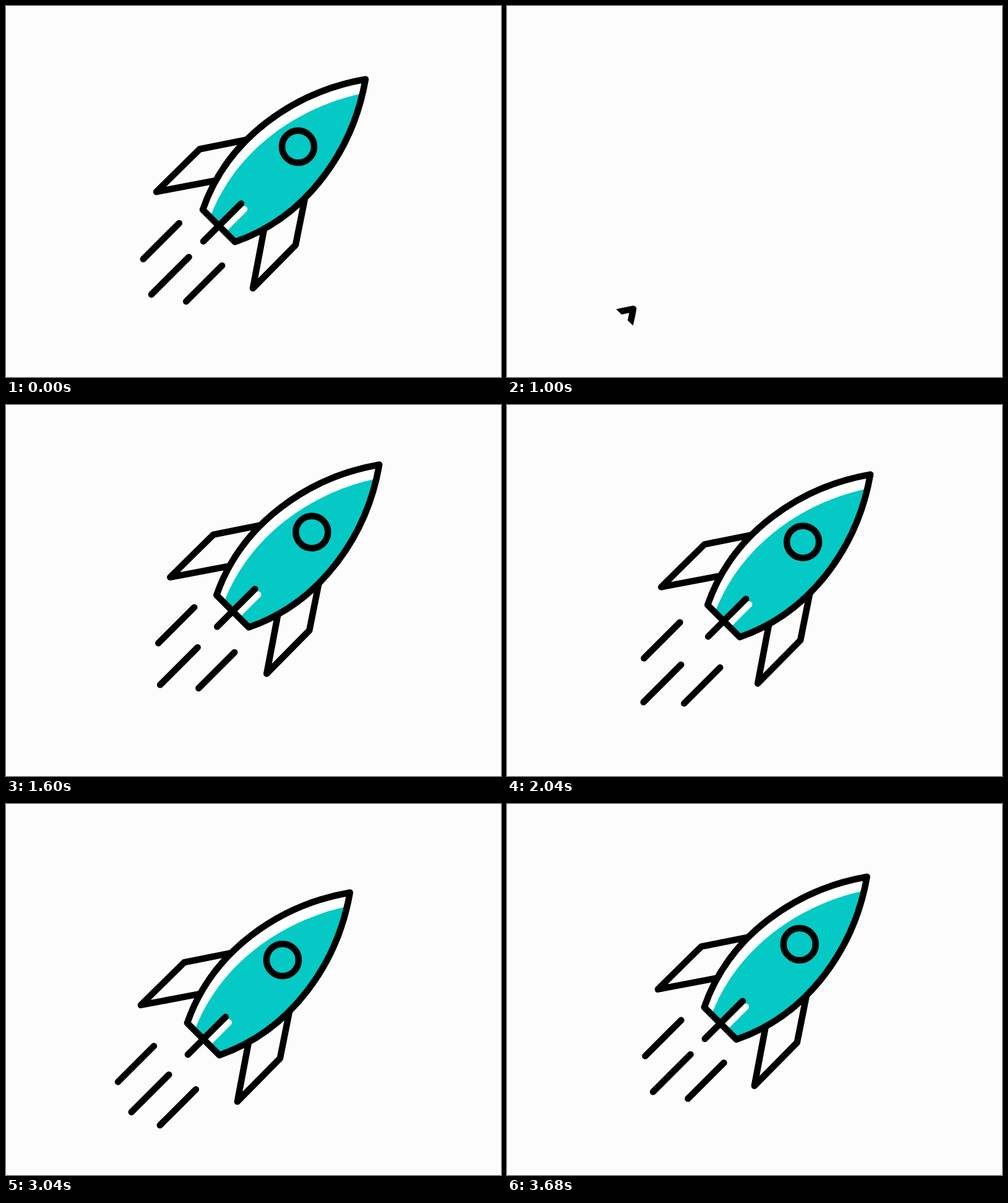
Recreate the animation shown at these times as an HTML page. Size 800 px wide and 600 px high, loop 3700 ms.

```html
<!DOCTYPE html>
<html lang="en">
<head>
<meta charset="utf-8">
<title>Rocket</title>
<style>
  html, body { margin: 0; width: 100%; height: 100%; overflow: hidden; background: #fcfcfc; }
  svg { display: block; width: 100vw; height: 100vh; }
  .ink { fill: none; stroke: #000; stroke-width: 10.5; stroke-linecap: round; stroke-linejoin: round; }
  .white { fill: #fff; }
  .teal { fill: #04c9c5; }
  .slit { stroke: #fff; }
</style>
</head>
<body>
<svg viewBox="0 0 800 600">
  <defs>
    <path id="hull" d="M581 119C466 139 358 214 318 330L370 382C486 342 561 234 581 119Z"/>
    <clipPath id="hullClip"><use href="#hull"/></clipPath>
    <clipPath id="band"><path d="M-89 233L342 -198L908 351L477 782Z"/></clipPath>
  </defs>
  <g id="scene" clip-path="url(#band)">
    <path class="ink trail" d="M222 409L280 351"/>
    <path class="ink trail" d="M235 466.5L295.5 406"/>
    <path class="ink trail" d="M291 478L349 420"/>
    <g id="rocket">
      <g transform="translate(0 -.5)">
        <path class="ink" d="M388 217L313 232L243 301L338 283"/>
        <path class="ink" d="M483 312L468 387L399 457L417 362"/>
        <use href="#hull" class="white"/>
        <g clip-path="url(#hullClip)">
          <use href="#hull" class="teal" x="9" y="20"/>
          <path class="ink slit" d="M385 329L340 374"/>
        </g>
        <use href="#hull" class="ink"/>
        <circle class="ink" cx="472" cy="228" r="26"/>
        <path class="ink" d="M380 320L319 381"/>
      </g>
    </g>
  </g>
</svg>
<script>
  const LOOP = 3700, CYCLE = 1860, ENTRY = 1000, STEP = 20;
  const PEAK = 355, REST = 865, GONE = 1480;

  const scene = document.getElementById('scene');
  const rocket = document.getElementById('rocket');
  const trails = [...document.querySelectorAll('.trail')];

  // Lag behind the rocket on entry and exit (ms), sag while hovering, dip before launch
  const follow = [
    { lagIn: 15, lagOut: 26, sag: 0,  dip: 18.5, start: 850, span: 230 },
    { lagIn: 7,  lagOut: 26, sag: 9,  dip: 24.5, start: 860, span: 272 },
    { lagIn: 16, lagOut: 20, sag: 4,  dip: 19,   start: 860, span: 240 }
  ];

  // Horizontal distance from the resting place
  function flight(u) {
    if (u < PEAK) return 42 - 419 * (1 - u / PEAK) ** 2.59;
    if (u < REST) return 21 + 21 * Math.cos(Math.PI * (u - PEAK) / (REST - PEAK));
    const s = (u - REST) / 535;
    return 56 * s ** 2 + 179 * s ** 6;
  }

  function bump(u, start, span) {
    const k = (u - start) / span;
    return k > 0 && k < 1 ? Math.sin(Math.PI * k) ** 2 : 0;
  }

  function place(node, d) {
    node.setAttribute('transform', `translate(${d} ${-d * 0.985})`);
  }

  function draw(time) {
    const t = Math.floor(time % LOOP / STEP) * STEP;
    const u = (t - ENTRY + CYCLE) % CYCLE;
    scene.style.display = u < GONE ? '' : 'none';
    place(rocket, flight(u));
    trails.forEach((trail, i) => {
      const f = follow[i];
      const base = u < REST ? flight(u - f.lagIn) : flight(Math.max(REST, u - f.lagOut));
      place(trail, base - f.sag * bump(u, 400, 400) - f.dip * bump(u, f.start, f.span));
    });
  }

  const begin = performance.now();
  function tick() {
    draw(performance.now() - begin);
    requestAnimationFrame(tick);
  }
  tick();
</script>
</body>
</html>
```
